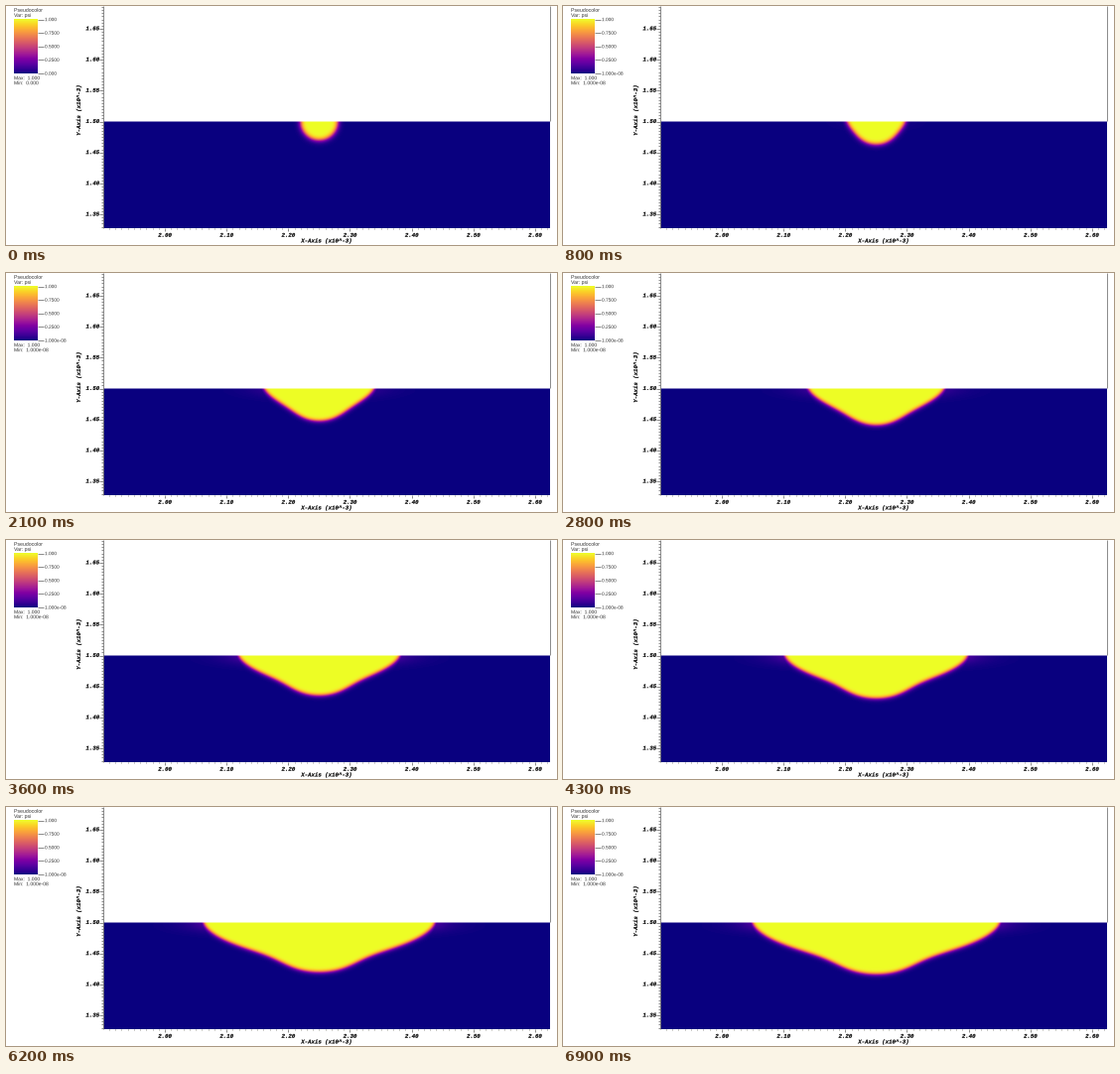
A matplotlib script for the animation above (7000 ms loop, 555 by 241 pixels).

```python
import numpy as np
import matplotlib.pyplot as plt
from matplotlib.animation import FuncAnimation
from matplotlib.colors import ListedColormap
from matplotlib.patches import PathPatch, Rectangle
from matplotlib.textpath import TextPath
from matplotlib.transforms import Affine2D

W, H, DPI = 555, 241, 100
FRAMES, HOLD = 70, 3
LEFT, RIGHT, TOP, BOTTOM = 98, 548, 116, 224
SURFACE, CENTER = 116.5, 315.5
GRAY = "#777777"

# Front radius by angle from the vertical, at a few growth steps
ANGLES = np.radians([0, 15, 30, 45, 60, 70, 80, 90])
STEPS = [0, 11, 25, 40, 50, 66]
RADII = np.array([
    [18.7] * 8,
    [28.2, 28.4, 29, 29.4, 31.4, 34, 37.6, 42],
    [36.8, 37.1, 37.8, 39.4, 44, 50, 59.2, 68.5],
    [43, 43.8, 45, 47.2, 54.2, 62.8, 78.5, 92],
    [47, 47.8, 49.2, 52.2, 60.7, 71.2, 90.5, 106],
    [52, 52.9, 54.5, 58.2, 68.2, 80.7, 104.5, 124.5],
])

gx, gy = np.meshgrid(np.arange(LEFT, RIGHT) + 0.5 - CENTER,
                     np.maximum(np.arange(TOP, BOTTOM) + 0.5 - SURFACE, 0))
dist = np.hypot(gx, gy)
phi = np.arctan2(np.abs(gx), gy)

shade = np.linspace(0, 1, 256)[:, None]
plasma = plt.get_cmap("plasma")(shade[:, 0])[:, :3]
tint = np.array([-3, -8, -7]) * (1 - shade) + np.array([-2, 5, 4]) * shade
cmap = ListedColormap(np.clip(plasma + tint / 255, 0, 1))


def field(step):
    radii = [np.interp(step, STEPS, col) for col in RADII.T]
    log_r = np.poly1d(np.polyfit(ANGLES**2, np.log(radii), 4))
    slope = 2 * phi * log_r.deriv()(phi**2)
    d = (np.exp(log_r(phi**2)) - dist) / np.sqrt(1 + slope**2)
    width = np.interp(step, [0, 11], [2.8, 2.2])
    psi = 0.5 * (1 + np.tanh(d / width))
    glow = 0.15 * min(step / 40, 1) * np.exp(np.minimum(d, 0) / 13 - (gy / 9)**2)
    return np.maximum(psi, glow)


fig = plt.figure(figsize=(W / DPI, H / DPI), dpi=DPI, facecolor="white")
ax = fig.add_axes([0, 0, 1, 1])
ax.axis("off")


def label(x, y, s, px, align=0, angle=0, color="#333333", lw=0, **font):
    """Draw text centred on y; align 0, 0.5, 1 is left, centre, right."""
    path = TextPath((0, 0), s, size=px, prop={"family": "Liberation Sans"} | font)
    shift = -align * path.get_extents().x1
    place = Affine2D().translate(shift, -0.34 * px).scale(1, -1)
    place.rotate_deg(-angle).translate(x, y)
    patch = PathPatch(place.transform_path(path), fc=color, ec=color, lw=lw, snap=False)
    return ax.add_patch(patch)


def axis_text(x, y, s, **kw):
    label(x, y, s, 5.7, color="black", lw=0.12, family="Liberation Mono",
          weight="bold", style="italic", **kw)


def line(x0, y0, x1, y1, color=GRAY):
    ax.plot([x0, x1], [y0, y1], lw=0.6, color=color, solid_capstyle="butt")


def px_x(v):
    return 160 + (v - 2) * 621.5


def px_y(v):
    return SURFACE - (v - 1.5) * 624


image = ax.imshow(field(0), cmap=cmap, vmin=0, vmax=1, aspect="auto",
                  extent=(LEFT, RIGHT, BOTTOM, TOP), interpolation="nearest")
ax.add_patch(Rectangle((LEFT, TOP), RIGHT - LEFT, SURFACE - TOP,
                       fc="white", lw=0, snap=False))

# Frame and ticks
line(LEFT - 0.5, 0, LEFT - 0.5, BOTTOM)
line(RIGHT - 0.5, 0, RIGHT - 0.5, TOP)
for i in range(191, 263):
    x = px_x(i / 100)
    if LEFT <= x <= RIGHT:
        line(x, BOTTOM, x, BOTTOM + (3 if i % 10 == 0 else 1))
for i in range(266, 338):
    y = px_y(i / 200)
    line(LEFT - (4 if i % 10 == 0 else 2), y, LEFT, y)
for i in range(7):
    v = 2 + i / 10
    axis_text(px_x(v), 230.8, f"{v:.2f}", align=0.5)
    v = 1.35 + i / 20
    axis_text(94, px_y(v) - 0.5, f"{v:.2f}", align=1)
axis_text(322.5, 236.5, "X-Axis (x10^-3)", align=0.5)
axis_text(73, 105.5, "Y-Axis (x10^-3)", align=0.5, angle=90)

# Legend
label(8, 4, "Pseudocolor", 5.2)
label(8, 9.2, "Var: psi", 5.2)
ax.imshow(shade[::-1], cmap=cmap, aspect="auto", extent=(8, 32, 68, 13))
for i, s in enumerate(["1.000", "0.7500", "0.5000", "0.2500", ""]):
    y = 13.5 + 13.6 * i
    line(32, y, 38, y)
    if s:
        label(39, y, s, 4.8)
label(8, 72.5, "Max:  1.000", 5)


def minimum(value):
    return label(39, 68, value, 4.8), label(8, 77.5, "Min:  " + value, 5)


start_text = minimum("0.000")
later_text = minimum("1.000e-08")
ax.set(xlim=(0, W), ylim=(H, 0))


def update(n):
    step = max(0, n - HOLD)
    for t in start_text:
        t.set_visible(step == 0)
    for t in later_text:
        t.set_visible(step > 0)
    image.set_data(field(step))
    return image, *start_text, *later_text


anim = FuncAnimation(fig, update, frames=FRAMES, interval=100,
                     repeat=True, repeat_delay=0, blit=False)
plt.show()
```
